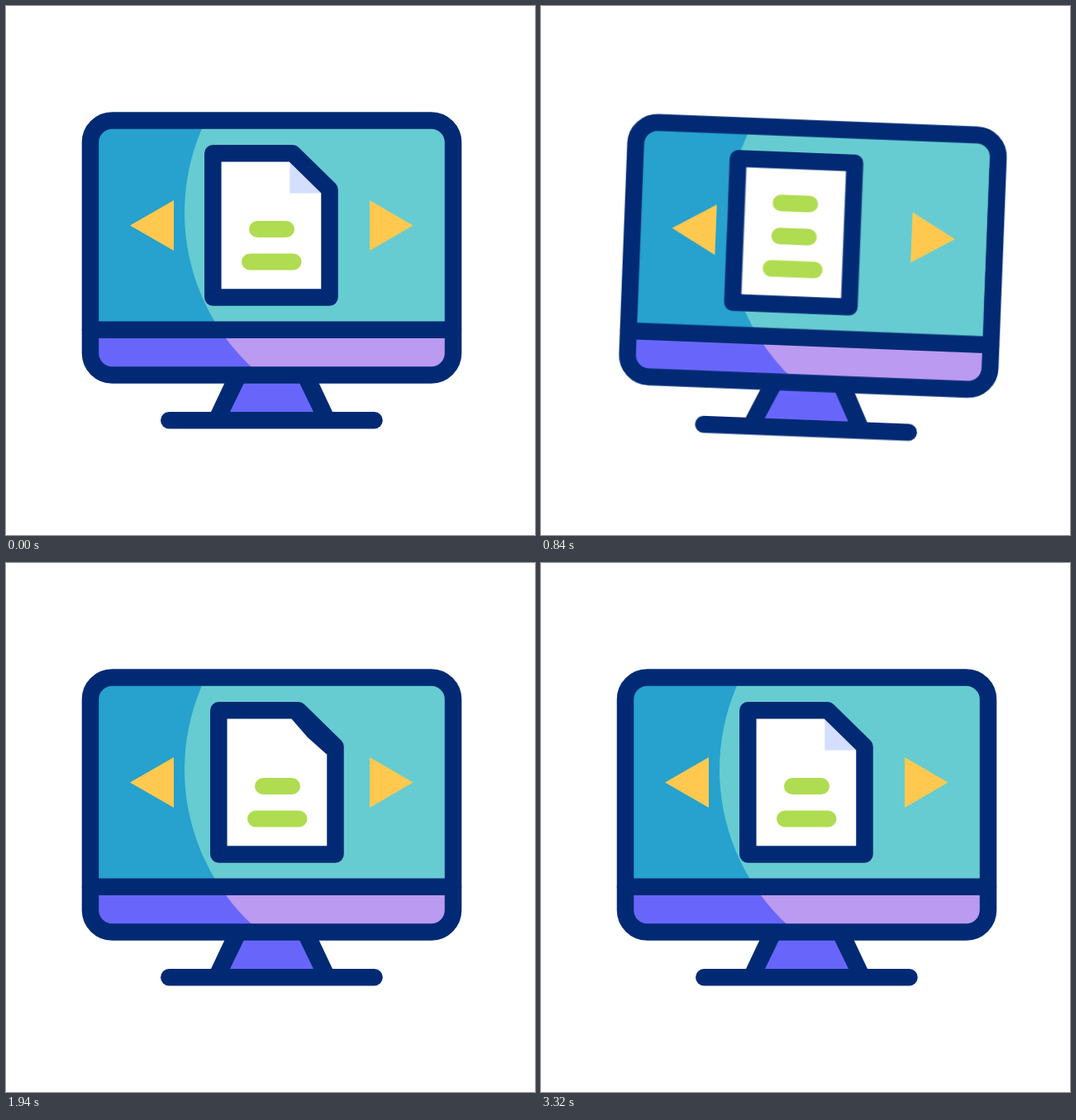
An HTML page that plays this animation: 640 by 640 pixels, repeating every 3.6 s.

```html
<!DOCTYPE html>
<html lang="en">
<head>
<meta charset="utf-8">
<title>Page browsing</title>
<style>
  html, body { margin: 0; width: 100%; height: 100%; overflow: hidden; background: #fff; }
  svg { display: block; width: 100vw; height: 100vh; }

  .navy { fill: #022a74; }
  .line { fill: none; stroke: #022a74; stroke-width: 20.5; stroke-linejoin: round; stroke-linecap: round; }
  .paper { fill: #fff; }
  .text { stroke: #b0dc51; stroke-width: 20; stroke-linecap: round; }
  .arrow { fill: #ffc950; }

  .lift, .tilt, .strip, .arrow { animation: 3600ms linear infinite; }
  .lift { animation-name: lift; }
  .tilt { animation-name: tilt; transform-origin: 321.5px 482px; }
  .strip { animation-name: strip; }
  .next { animation-name: next; }
  .prev { animation-name: prev; }

  @keyframes lift {
    0% { transform: translateY(0); }
    5.556% { transform: translateY(0); animation-timing-function: cubic-bezier(.37, 0, .63, 1); }
    13.611% { transform: translateY(-33.5px); animation-timing-function: cubic-bezier(.37, 0, .63, 1); }
    30.833% { transform: translateY(38px); animation-timing-function: cubic-bezier(.3, 0, .55, 1); }
    53.889%, 100% { transform: translateY(0); }
  }
  @keyframes tilt {
    0% { transform: rotate(0deg); }
    5.556% { transform: rotate(0deg); animation-timing-function: cubic-bezier(.37, 0, .63, 1); }
    20% { transform: rotate(3deg); animation-timing-function: cubic-bezier(.37, 0, .63, 1); }
    34.444% { transform: rotate(-3deg); animation-timing-function: cubic-bezier(.37, 0, .63, 1); }
    44.444%, 100% { transform: rotate(0deg); }
  }
  @keyframes strip {
    0% { transform: translateX(0); }
    5.556% { transform: translateX(0); animation-timing-function: cubic-bezier(.333, .667, .667, 1); }
    29.722% { transform: translateX(313px); }
    35% { transform: translateX(313px); animation-timing-function: cubic-bezier(.333, .667, .667, 1); }
    53.889% { transform: translateX(619px); }
    65.556% { transform: translateX(619px); animation-timing-function: cubic-bezier(.2, .48, .45, 1); }
    92.222%, 100% { transform: translateX(0); }
  }
  @keyframes next {
    0%, 5.556% { fill: #ffc950; }
    8.333%, 18.6% { fill: #ff6051; }
    21.4%, 35% { fill: #ffc950; }
    37.8%, 47% { fill: #ff6051; }
    49.8%, 100% { fill: #ffc950; }
  }
  @keyframes prev {
    0%, 65.556% { fill: #ffc950; }
    68.333%, 77.8% { fill: #ff6051; }
    80.6%, 100% { fill: #ffc950; }
  }
</style>
</head>
<body>
<svg viewBox="0 0 640 640">
  <defs>
    <clipPath id="body"><rect x="102" y="138.5" width="439" height="308" rx="26.5"/></clipPath>
    <clipPath id="screen"><rect x="102" y="138.5" width="439" height="253.5" rx="26.5"/></clipPath>
    <path id="cut" d="M10.3 178.2H106.8L151.5 222V352.6H10.3Z"/>
    <g id="lines" class="text"><path d="M64 270H99M55 309.5H107.500"/></g>
  </defs>

  <g class="lift"><g class="tilt">
    <path class="navy" d="M265 455H378L395 491V501H248V491Z"/>
    <path fill="#6866fa" d="M288.500 455H354.500L372 491H271Z"/>
    <path class="line" d="M197.300 501.200H445.500"/>

    <g clip-path="url(#body)">
      <path fill="#27a1ce" d="M102 138H541V392H102Z"/>
      <path fill="#6866fa" d="M102 392H541V447H102Z"/>
      <circle cx="472" cy="250" r="256" fill="#66ccd1" clip-path="url(#screen)"/>
      <g clip-path="url(#lower)"><circle cx="472" cy="250" r="256" fill="#bb9af1"/></g>
    </g>
    <clipPath id="lower"><path d="M102 392H541V447H102Z"/></clipPath>

    <g clip-path="url(#screen)"><g class="strip">
      <g transform="translate(240 0)">
        <use href="#cut" class="paper"/>
        <path fill="#d4defe" d="M103.300 180V226.500H150V222L107 180Z"/>
        <use href="#cut" class="line"/>
        <use href="#lines"/>
      </g>
      <g transform="translate(-75 0)">
        <rect x="10.300" y="178.200" width="141.200" height="174.400" class="paper"/>
        <rect x="10.300" y="178.200" width="141.200" height="174.400" class="line"/>
        <path class="text" d="M64 230H99"/>
        <use href="#lines"/>
      </g>
      <g transform="translate(-372 0)">
        <use href="#cut" class="paper"/>
        <use href="#cut" class="line"/>
        <path class="navy" d="M98 188L118 211L141 231.500L150 222L107 178Z"/>
        <use href="#lines"/>
      </g>
    </g></g>

    <path class="arrow prev" d="M150 265.500L203 235V296Z"/>
    <path class="arrow next" d="M492.500 265.500L440 235V296Z"/>
    <path class="line" d="M102 391.800H541"/>
    <rect class="line" x="102" y="138.500" width="439" height="308" rx="26.500"/>
  </g></g>
</svg>
</body>
</html>
```
